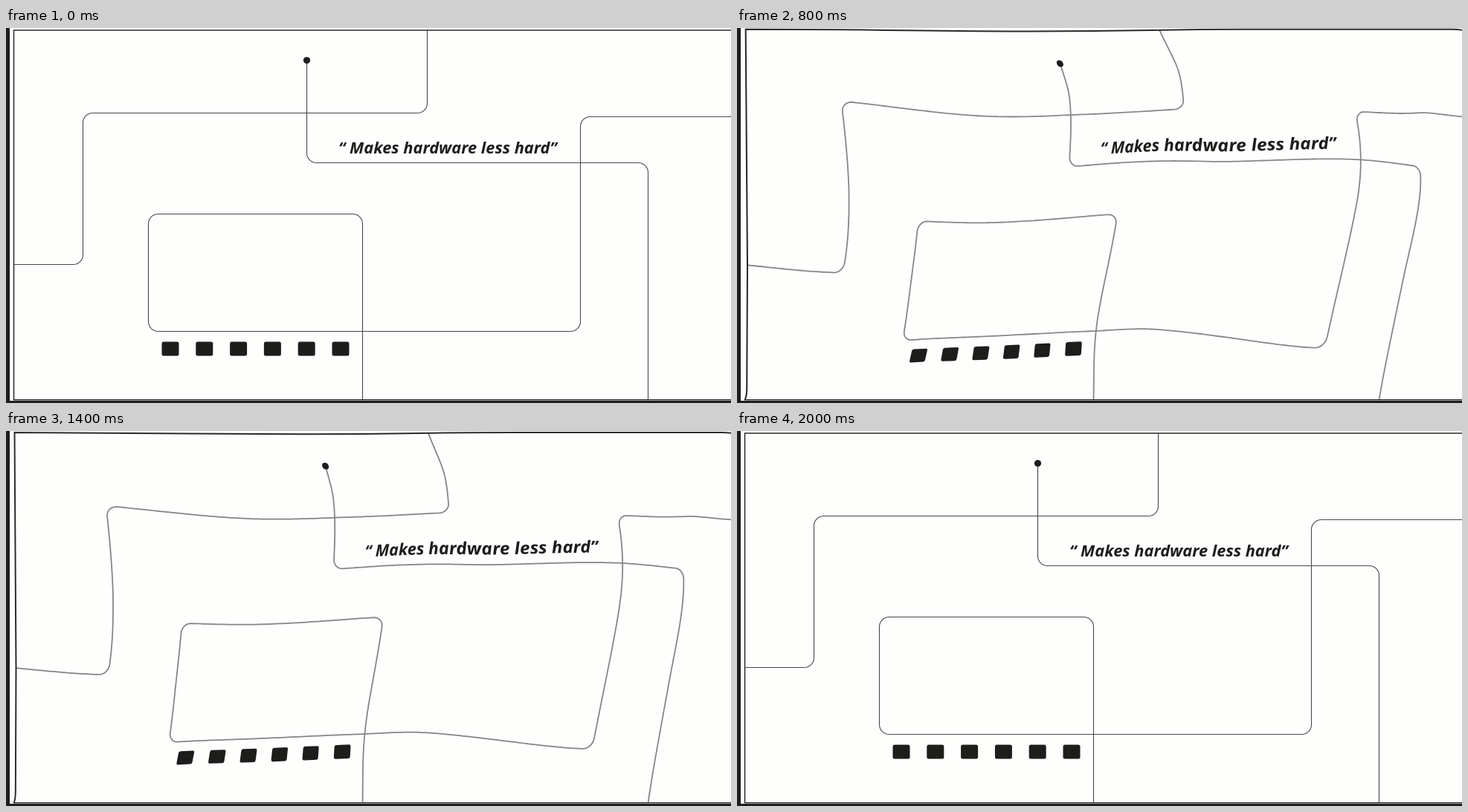
Recreate the animation shown at these times as an HTML page with a canvas. Size 975 by 505 pixels, loop 2100 ms.

```html
<!DOCTYPE html>
<html lang="en">
<head>
<meta charset="utf-8">
<title>Circuit lines</title>
<style>
  html, body { margin: 0; width: 100%; height: 100%; overflow: hidden; background: #fefefd; }
  canvas { display: block; }
</style>
</head>
<body>
<canvas id="stage" width="975" height="505" aria-label="“ Makes hardware less hard”"></canvas>
<script>
const ctx = document.getElementById('stage').getContext('2d');
const INK = '#1d1d1b', PAPER = '#fefefd';
const LABEL = '“ Makes hardware less hard”';
const LABEL_X = 447, LABEL_Y = 168.5, LABEL_WIDTH = 294;

// Key points of each wire: x, y and how far the sheet is pulled there (dx, dy)
const upperWire = [
  [566.5, 3, 2, -1], [566.5, 55, 35, 0], [566.5, 114.5, 46, -7], [300, 114.5, 55, 6],
  [103.5, 114.5, 48, -21], [103.5, 215, 60, -1], [103.5, 318.5, 49, 14], [48, 318.5, 46, 10],
  [10, 318.5, 5, 1]
];
const loopWire = [
  [479.5, 501, 0, 0], [479.5, 390, 7, 0], [479.5, 250.5, 41, 0], [290, 250.5, 55, 15],
  [191.5, 250.5, 66, 12], [191.5, 408.5, 38, 15], [545, 408.5, 5, -4], [772.5, 408.5, 22, 27],
  [772.5, 260, 72, -4], [772.5, 119.5, 77, -9], [905, 119.5, 28, -7], [976, 119.5, 0, 0]
];
const dotWire = [
  [404.5, 43.5, 40, 6], [404.5, 85, 55, 3], [404.5, 181.5, 54, 7], [600, 181.5, 63, -2],
  [863.5, 181.5, 71, 6], [863.5, 320, 45, 2], [863.5, 501, 0, 0]
];
const padEnds = [[221, 432, 28, 11], [450, 432, 3, 0]];
const pulls = [...upperWire, ...loopWire, ...dotWire, ...padEnds];

// Thin-plate spline through the pulls
const bend = (x, y) => {
  const q = x * x + y * y;
  return q ? q * Math.log(q) : 0;
};
const basis = (x, y) => [
  ...pulls.map(p => bend((x - p[0]) / 100, (y - p[1]) / 100)), 1, x / 100, y / 100
];

// Gauss-Jordan elimination; the last two columns hold the wanted dx, dy
function solve(rows) {
  const n = rows.length;
  for (let i = 0; i < n; i++) {
    let best = i;
    for (let r = i + 1; r < n; r++) {
      if (Math.abs(rows[r][i]) > Math.abs(rows[best][i])) best = r;
    }
    [rows[i], rows[best]] = [rows[best], rows[i]];
    rows[i] = rows[i].map(v => v / rows[i][i]);
    rows.forEach((row, r) => {
      if (r !== i) rows[r] = row.map((v, c) => v - row[i] * rows[i][c]);
    });
  }
  return rows.map(r => r.slice(n));
}

function makeWarp(t) {
  const n = pulls.length;
  const rows = pulls.map(([x, y, dx, dy]) => {
    // Lower parts move early, upper parts late
    const amount = t + (y - 200) / 900 * t * (1 - t);
    return [...basis(x, y), dx * amount, dy * amount];
  });
  for (let k = 0; k < 3; k++) {
    rows.push([...pulls.map((p, i) => rows[i][n + k]), 0, 0, 0, 0, 0]);
  }
  const weights = solve(rows);
  return (x, y) => {
    basis(x, y).forEach((b, i) => {
      x += b * weights[i][0];
      y += b * weights[i][1];
    });
    return [x, y];
  };
}

// Dense points along a polyline with rounded corners
function samples(corners, radius = 13) {
  const out = [corners[0]];
  const toward = (a, b) => {
    const k = radius / Math.hypot(b[0] - a[0], b[1] - a[1]);
    return [(b[0] - a[0]) * k, (b[1] - a[1]) * k];
  };
  const lineTo = end => {
    const [x, y] = out[out.length - 1];
    const n = Math.ceil(Math.hypot(end[0] - x, end[1] - y) / 5);
    for (let i = 1; i <= n; i++) out.push([x + (end[0] - x) * i / n, y + (end[1] - y) * i / n]);
  };
  for (let i = 1; i < corners.length - 1; i++) {
    const c = corners[i], p = toward(c, corners[i - 1]), q = toward(c, corners[i + 1]);
    lineTo([c[0] + p[0], c[1] + p[1]]);
    for (let s = 1; s <= 8; s++) {
      const a = s * Math.PI / 16, u = 1 - Math.sin(a), v = 1 - Math.cos(a);
      out.push([c[0] + p[0] * u + q[0] * v, c[1] + p[1] * u + q[1] * v]);
    }
  }
  lineTo(corners[corners.length - 1]);
  return out;
}
const wires = [upperWire, loopWire, dotWire].map(w => samples(w));

const mix = (a, b, t) => a + (b - a) * t;

function drawWires(t, warp) {
  const shade = mix(72, 145, Math.sqrt(t));
  ctx.strokeStyle = `rgb(${shade},${shade},${shade})`;
  ctx.lineWidth = mix(1.1, 1.9, Math.sqrt(t));
  for (const wire of wires) {
    ctx.beginPath();
    wire.forEach(([x, y]) => ctx.lineTo(...warp(x, y)));
    ctx.stroke();
  }
}

// Runs draw() in the sheared frame around a point
function place(warp, x, y, hw, hh, draw) {
  const [l, r, u, d] = [warp(x - hw, y), warp(x + hw, y), warp(x, y - hh), warp(x, y + hh)];
  ctx.save();
  ctx.transform((r[0] - l[0]) / (2 * hw), (r[1] - l[1]) / (2 * hw),
    (d[0] - u[0]) / (2 * hh), (d[1] - u[1]) / (2 * hh), ...warp(x, y));
  draw();
  ctx.restore();
}

function drawBorder(t) {
  const top = 3 - 1.5 * t, dip = 3 + 2 * t, foot = 10.5 + 3.5 * t;
  ctx.strokeStyle = '#2a2a2a';
  ctx.lineWidth = mix(1.5, 2.2, t);
  ctx.beginPath();
  ctx.moveTo(10.5, 501);
  ctx.quadraticCurveTo(foot, 496, foot, 485);
  ctx.lineTo(10.5 + 4.5 * t, 320);
  ctx.lineTo(10.5 + 1.5 * t, top);
  ctx.bezierCurveTo(200, top, 250, dip, 400, dip);
  ctx.bezierCurveTo(550, dip, 560, top, 680, top);
  ctx.lineTo(962, top);
  ctx.quadraticCurveTo(970, top, 976, 3);
  ctx.stroke();
  ctx.fillStyle = INK;
  ctx.fillRect(10, 500, 965, 1.4);
  ctx.fillRect(0, 502, 975, 3);
  ctx.fillRect(0, 0, 5, 505);
}

const setFont = size => { ctx.font = `italic 700 ${size}px "Open Sans", "Noto Sans", sans-serif`; };
setFont(100);
const fontSize = 100 * LABEL_WIDTH / ctx.measureText(LABEL).width;

function drawLabel(warp) {
  setFont(fontSize);
  [...LABEL].forEach((ch, i) => {
    const w = ctx.measureText(ch).width;
    const x = LABEL_X + ctx.measureText(LABEL.slice(0, i + 1)).width - w / 2;
    place(warp, x, LABEL_Y - 8, w / 2, 8, () => ctx.fillText(ch, -w / 2, 8));
  });
}

function draw(t) {
  const warp = makeWarp(t);
  ctx.fillStyle = PAPER;
  ctx.fillRect(0, 0, 975, 505);
  drawWires(t, warp);
  drawBorder(t);

  place(warp, 404.5, 43.5, 4.5, 4.5, () => {
    ctx.beginPath();
    ctx.arc(0, 0, 4.6, 0, 7);
    ctx.fill();
  });
  for (let i = 0; i < 6; i++) {
    place(warp, 221 + i * 45.8, 432, 11.5, 9.5, () => {
      ctx.beginPath();
      ctx.roundRect(-11.5, -9.5, 23, 19, 2.5);
      ctx.fill();
    });
  }
  drawLabel(warp);
}

// Nine hard steps out, a short hold, nine steps back
let shown = -1;
function tick(now) {
  const n = Math.floor(now % 2100 / 100);
  const step = Math.max(0, Math.min(n - 1, 20 - n, 9));
  if (step !== shown) draw(step / 9);
  shown = step;
  requestAnimationFrame(tick);
}
tick(performance.now());
</script>
</body>
</html>
```
